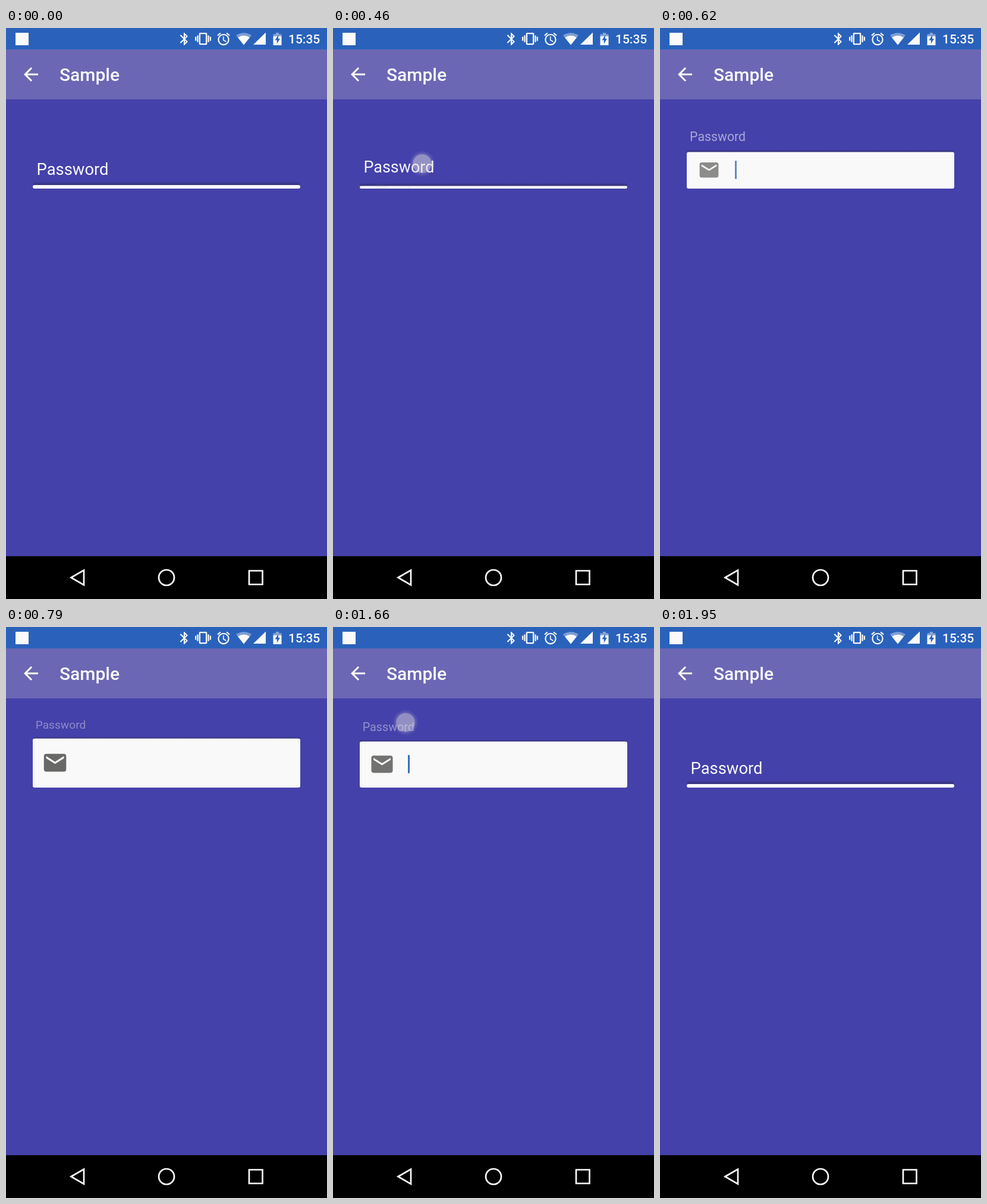
An HTML page with a canvas for the animation above (1990 ms loop, 540x960 px).

```html
<!DOCTYPE html>
<html lang="en">
<head>
<meta charset="utf-8">
<title>Expanding text field</title>
<style>
  html, body { margin: 0; width: 100%; height: 100%; overflow: hidden; background: #4441aa; }
  canvas { display: block; }
</style>
</head>
<body>
<canvas id="stage" width="540" height="960"></canvas>
<script>
const ctx = document.getElementById('stage').getContext('2d');
const LOOP = 1990, FPS = 24, LAST = 47;
const OPEN = 9.825, CLOSE = 38.72, SPAN = 7.8; // in frames
const FONT = 'Roboto, "Noto Sans", sans-serif';
const BG = '#4441aa', STATUS = '#2a62bb', PALE = '#fafafc';

const ICONS = {
  back: 'M20 11H7.83l5.59-5.59L12 4l-8 8 8 8 1.41-1.41L7.83 13H20v-2z',
  mail: 'M20 4H4c-1.1 0-1.99.9-1.99 2L2 18c0 1.1.9 2 2 2h16c1.1 0 2-.9 2-2V6c0-1.1-.9-2-2-2zm0 4l-8 5-8-5V6l8 5 8-5v2z',
  bluetooth: 'M17.71 7.71L12 2h-1v7.59L6.41 5 5 6.41 10.59 12 5 17.59 6.41 19 11 14.41V22h1l5.71-5.71-4.3-4.29 4.3-4.29zM13 5.83l1.88 1.88L13 9.59V5.83zm1.88 10.46L13 18.17v-3.76l1.88 1.88z',
  vibrate: 'M0 15h2V9H0v6zm3 2h2V7H3v10zm19-8v6h2V9h-2zm-3 8h2V7h-2v10zM16.5 3h-9C6.67 3 6 3.67 6 4.5v15c0 .83.67 1.5 1.5 1.5h9c.83 0 1.5-.67 1.5-1.5v-15c0-.83-.67-1.5-1.5-1.5zM16 19H8V5h8v14z',
  alarm: 'M22 5.72l-4.6-3.86-1.29 1.53 4.6 3.86L22 5.72zM7.88 3.39L6.6 1.86 2 5.71l1.29 1.53 4.59-3.85zM12.5 8H11v6l4.75 2.85.75-1.23-4-2.37V8zM12 4c-4.97 0-9 4.03-9 9s4.02 9 9 9c4.97 0 9-4.03 9-9s-4.03-9-9-9zm0 16c-3.87 0-7-3.13-7-7s3.13-7 7-7 7 3.13 7 7-3.13 7-7 7z'
};
for (const name in ICONS) ICONS[name] = new Path2D(ICONS[name]);

const clamp = v => Math.min(1, Math.max(0, v));
const mix = (a, b, p) => a + (b - a) * p;
const ease = v => (1 - Math.cos(Math.PI * clamp(v))) / 2;

function rect(x, y, w, h, color) {
  ctx.fillStyle = color;
  ctx.fillRect(x, y, w, h);
}

function shape(d, color, stroke) {
  const path = new Path2D(d);
  ctx.fillStyle = ctx.strokeStyle = color;
  if (stroke) {
    ctx.lineWidth = stroke;
    ctx.stroke(path);
  } else ctx.fill(path);
}

// 24-unit icon centred on x, y
function icon(name, x, y, scale, color) {
  ctx.save();
  ctx.translate(x, y);
  ctx.scale(scale, scale);
  ctx.translate(-12, -12);
  ctx.fillStyle = color;
  ctx.fill(ICONS[name]);
  ctx.restore();
}

function text(str, x, y, size, weight, color) {
  ctx.font = `${weight} ${size}px ${FONT}`;
  ctx.fillStyle = color;
  ctx.fillText(str, x, y);
}

function statusBar() {
  rect(0, 0, 540, 36, STATUS);
  rect(16, 8, 22, 21, PALE);
  icon('bluetooth', 300, 18.5, 1.05, PALE);
  icon('vibrate', 331.5, 18, 1.125, PALE);
  icon('alarm', 366, 18.5, 1.07, PALE);
  shape('M400 28.5L387 12.3Q400 4 413 12.3Z', 'rgba(250,250,252,.4)');
  shape('M400 28.5L390 16Q400 9.5 410 16Z', PALE);
  shape('M437 7.5V28H416Z', PALE);
  shape('M454 8h5v2.5h4.5V14h-14v-3.5H454z', 'rgba(250,250,252,.45)');
  rect(449.5, 14, 14, 15, PALE);
  shape('M458 12L452.5 20.5H455.8V26.5L461 18H458Z', STATUS);
  text('15:35', 475, 26, 21, 500, PALE);
}

function toolbar() {
  rect(0, 36, 540, 84, '#6c67b4');
  icon('back', 42, 78, 1.5, PALE);
  text('Sample', 90, 89, 30, 500, PALE);
}

function navBar() {
  rect(0, 888, 540, 72, '#000');
  shape('M109.5 924L131 911.5V936.5Z', PALE, 2.7);
  shape('M257 924a13 13 0 1 0 26 0a13 13 0 1 0 -26 0', PALE, 2.7);
  shape('M409 912.5H431.5V935.5H409Z', PALE, 2.7);
}

function card(h, p) {
  const top = 270 - h, reach = mix(6, 3, p);
  const shade = ctx.createLinearGradient(0, top - reach, 0, top);
  shade.addColorStop(0, 'rgba(40,38,80,0)');
  shade.addColorStop(1, 'rgba(40,38,80,.6)');
  rect(46, top - reach, 448, reach + 1, shade);
  ctx.fillStyle = '#f9f9fa';
  ctx.beginPath();
  ctx.roundRect(45, top, 450, h, Math.min(3, h / 2));
  ctx.fill();
}

function field(p, opening, caret) {
  const h = opening ? Math.max(4, 82.5 * p) : mix(6, 82.5, p);
  const mid = 269.5 - h / 2;
  card(h, p);

  ctx.globalAlpha = p;
  icon('mail', 82.5, mid, 1.875 * mix(0.4, 1, p), '#686866');
  if (caret) rect(126, mid - 15.5, 3, 30.5, '#2a66ac');
  ctx.globalAlpha = 1;

  const scale = mix(1, 0.7, p);
  ctx.save();
  ctx.translate(45.3, mix(246.8, 170.5, p));
  ctx.scale(scale, scale);
  ctx.globalAlpha = mix(1, 0.4, p);
  text('Password', 6.2, 0, 27.4, 400, PALE);
  ctx.restore();
}

function touch(x, y, alpha) {
  const glow = ctx.createRadialGradient(x, y, 0, x, y, 22);
  const stops = [[0, .68], [.68, .68], [.76, .22], [1, 0]];
  for (const [at, a] of stops) glow.addColorStop(at, `rgba(225,221,222,${a})`);
  ctx.globalAlpha = alpha;
  rect(x - 22, y - 22, 44, 44, glow);
  ctx.globalAlpha = 1;
}

function draw(ms) {
  const k = Math.min(LAST, Math.floor((ms + 9) * FPS / 1000));
  const p = ease((k - OPEN) / SPAN) - ease((k - CLOSE) / SPAN);
  const opening = k > OPEN && k < CLOSE;
  const caret = k < 19 || (k >= 31 && k < 43);
  const fade = start => clamp(1 - (k - start) / 4.8);

  rect(0, 0, 540, 960, BG);
  statusBar();
  toolbar();
  navBar();
  field(p, opening, caret);
  if (k >= 8 && k < 15) touch(150, 228, fade(OPEN));
  if (k >= 35) touch(122, 160.5, fade(CLOSE));
}

const begin = performance.now();
function tick() {
  draw((performance.now() - begin) % LOOP);
  requestAnimationFrame(tick);
}
tick();
</script>
</body>
</html>
```
